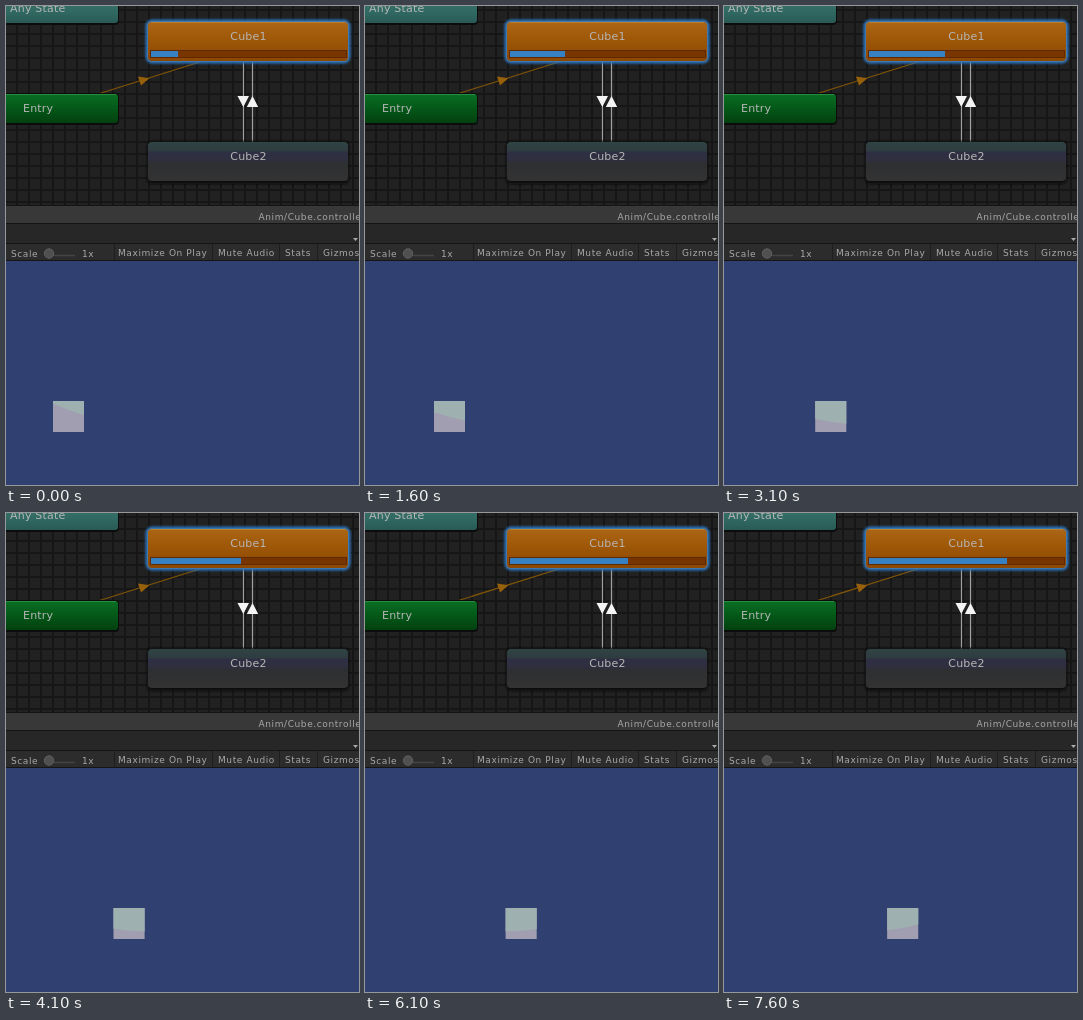
An HTML page for the animation above (8 s loop, 353 px wide and 479 px high).

```html
<!DOCTYPE html>
<html>
<head>
<meta charset="utf-8">
<style>
html, body { margin: 0; width: 100%; height: 100%; overflow: hidden; background: #202020; }
svg { display: block; }
text { font-family: "DejaVu Sans", sans-serif; font-size: 9px; letter-spacing: .6px; fill: #a8a8a8; }
.node { font-size: 11px; letter-spacing: .2px; fill: #b6b6b6; }
</style>
</head>
<body>
<svg width="353" height="479" viewBox="0 0 353 479">
  <defs>
    <pattern id="grid" width="12" height="12" x="-2" y="3" patternUnits="userSpaceOnUse">
      <rect width="12" height="12" fill="#212121"/>
      <path d="M0 1H12M1 0V12" stroke="#161616" stroke-width="2"/>
    </pattern>
    <linearGradient id="teal" x2="0" y2="1">
      <stop stop-color="#3a776d"/><stop offset=".6" stop-color="#316a63"/><stop offset="1" stop-color="#295a55"/>
    </linearGradient>
    <linearGradient id="green" x2="0" y2="1">
      <stop stop-color="#0a6f24"/><stop offset=".5" stop-color="#045818"/><stop offset="1" stop-color="#034010"/>
    </linearGradient>
    <linearGradient id="orange" x2="0" y2="1">
      <stop stop-color="#ab6617"/><stop offset=".4" stop-color="#a05908"/><stop offset="1" stop-color="#8c4702"/>
    </linearGradient>
    <linearGradient id="gray" x2="0" y2="1">
      <stop stop-color="#304444"/><stop offset=".22" stop-color="#2f3c40"/>
      <stop offset=".26" stop-color="#2f2f44"/><stop offset=".45" stop-color="#2f2f40"/>
      <stop offset=".55" stop-color="#2e2f31"/><stop offset="1" stop-color="#333333"/>
    </linearGradient>
    <filter id="soft" x="-10%" y="-30%" width="120%" height="160%"><feGaussianBlur stdDeviation="1.2"/></filter>
    <clipPath id="box"><rect id="boxRect" y="395" width="31.100" height="31"/></clipPath>
  </defs>

  <rect width="353" height="199" fill="url(#grid)"/>

  <path d="M92 88L197 55" stroke="#805406" stroke-width="1.3"/>
  <path d="M143.500 72.200L132 70.500L135 79.500Z" fill="#97600a"/>
  <path d="M237.500 55V136M246.500 55V136" stroke="#a0a0a0" stroke-width="1.2"/>
  <path d="M231.500 90H243L237.300 101ZM240.800 101H252.200L246.500 90Z" fill="#f4f4f4"/>

  <rect x="-20" y="-13" width="133" height="32" rx="4" fill="#0c0c0c"/>
  <rect x="-20" y="-13" width="132" height="30" rx="3" fill="url(#teal)"/>
  <text class="node" x="4" y="6">Any State</text>

  <rect x="-20" y="87" width="133" height="32" rx="4" fill="#0c0c0c"/>
  <rect x="-20" y="88" width="132" height="29" rx="3" fill="url(#green)"/>
  <path d="M0 88.500H110" stroke="#258c40"/>
  <text class="node" x="17" y="106">Entry</text>

  <rect x="141" y="135" width="202" height="43" rx="5" fill="#0c0c0c" filter="url(#soft)"/>
  <rect x="142" y="136" width="200" height="39" rx="4" fill="url(#gray)"/>
  <text class="node" x="242.500" y="154" text-anchor="middle">Cube2</text>

  <rect x="141" y="15" width="202" height="41" rx="5" fill="none" stroke="#2c74c0" stroke-width="3" filter="url(#soft)"/>
  <rect x="141.500" y="15.500" width="201" height="40" rx="4" fill="url(#orange)" stroke="#3f78ae"/>
  <path d="M145 16.500H339" stroke="#bd7f28"/>
  <text class="node" x="242.500" y="34" text-anchor="middle">Cube1</text>
  <rect x="144" y="44" width="197" height="8" fill="#5f2a00"/>
  <rect x="145" y="45" width="195" height="6" fill="#783500"/>
  <rect id="bar" x="145" y="45" height="6" fill="#3780c2"/>

  <rect y="199" width="353" height="56" fill="#151515"/>
  <rect y="200" width="353" height="17" fill="#383838"/>
  <rect y="218" width="353" height="19" fill="#272727"/>
  <rect y="238" width="353" height="16" fill="#2c2c2c"/>
  <path d="M108.500 238V254M206.500 238V254M273.500 238V254M311.500 238V254" stroke="#1e1e1e"/>
  <path d="M347 232H352L349.500 235Z" fill="#aaa"/>
  <text x="252.500" y="214">Anim/Cube.controller</text>
  <text x="5" y="251">Scale</text>
  <path d="M40 249.500H69" stroke="#444" stroke-width="1.500"/>
  <circle cx="43" cy="247.500" r="4.700" fill="#505050" stroke="#606060"/>
  <text x="76" y="251">1x</text>
  <text x="112" y="250">Maximize On Play</text>
  <text x="212" y="250">Mute Audio</text>
  <text x="279" y="250">Stats</text>
  <text x="317" y="250">Gizmos</text>

  <rect y="255" width="353" height="224" fill="#304070"/>
  <g clip-path="url(#box)">
    <rect y="390" width="353" height="40" fill="#a09eb0"/>
    <path d="M0 371Q140 466 280 371Z" fill="#9fb0b1"/>
  </g>
</svg>
<script>
const LOOP = 8000, STEP = 500, LEAD = 100;
const BAR_X = 145, BAR_W = 195;
const boxRect = document.getElementById("boxRect");
const bar = document.getElementById("bar");

const smooth = u => u * u * (3 - 2 * u);

// The picture holds still between steps.
function draw(t) {
  const step = t < LEAD ? 0 : 1 + Math.floor((t - LEAD) / STEP);
  const u = 0.1382 + 0.03574 * step;
  boxRect.setAttribute("x", 38.88 + 156 * smooth(u));
  bar.setAttribute("width", Math.round(BAR_X + BAR_W * u) - BAR_X);
}

const start = performance.now();
function tick() {
  draw((performance.now() - start) % LOOP);
  requestAnimationFrame(tick);
}
tick();
</script>
</body>
</html>
```
